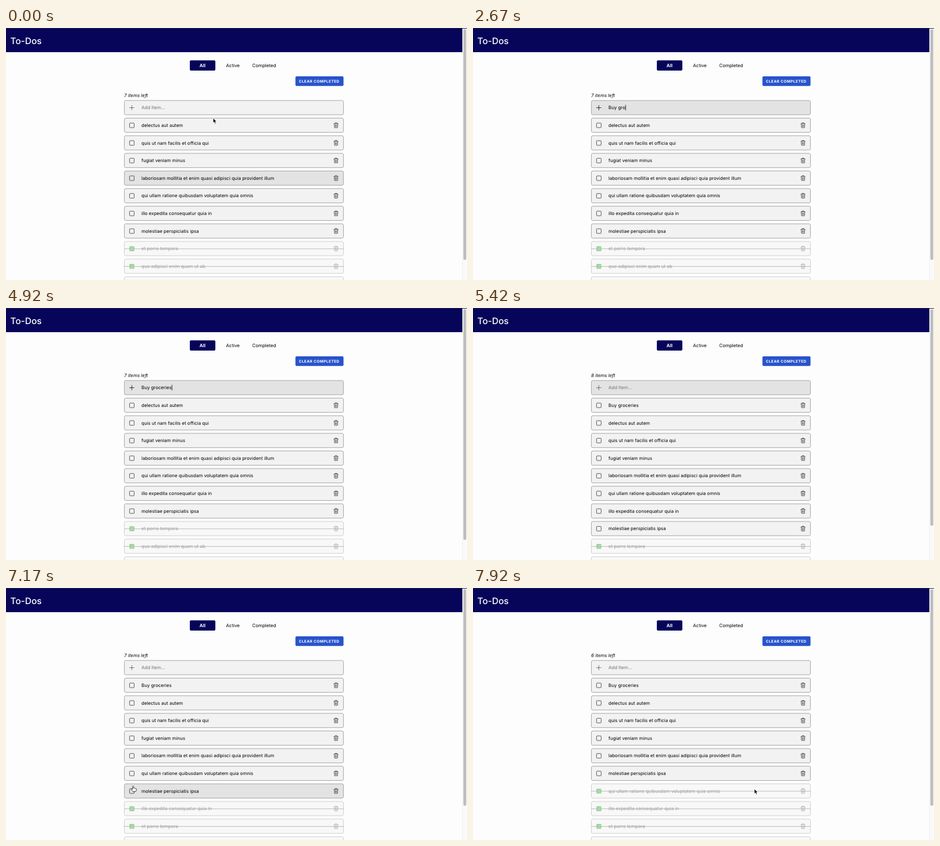
An HTML page for the animation above (8 s loop, 800 px wide and 438 px high).

```html
<!DOCTYPE html>
<html lang="en">
<head>
<meta charset="utf-8">
<title>To-Dos</title>
<style>
  html, body { margin: 0; width: 100%; height: 100%; overflow: hidden; background: #fdfdfd; }
  svg { display: block; width: 100%; height: 100%; }
  text { font: 400 8px Inter, "Liberation Sans", sans-serif; white-space: pre; text-rendering: geometricPrecision; }
  .title { font-size: 15.5px; font-weight: 500; fill: #fff; }
  .tab-on { font-weight: 700; fill: #fff; text-anchor: middle; }
  .clear { font-size: 6.5px; font-weight: 700; letter-spacing: .45px; fill: #fff; }
  .count { font-style: italic; }
  .box { fill: #f2f2f2; stroke: #9c9c9c; stroke-width: .9; }
  .hover { fill: #e3e3e3; }
  .hint { fill: #757575; }
  .line { fill: none; stroke: #333; stroke-width: .8; }
  .done { opacity: .4; }
  .done .box { stroke: #808080; }
</style>
</head>
<body>
<svg viewBox="0 0 800 438" preserveAspectRatio="none">
  <defs>
    <g id="bin" class="line" stroke-linejoin="round">
      <path d="M-4-2.8H4M-1.5-2.8V-4.2H1.5V-2.8M-3.1-2.8L-2.6 4.2H2.6L3.1-2.8"/>
      <path d="M-1.2-1.2L-1 2.8M0-1.2V2.8M1.2-1.2L1 2.8" stroke-width=".6"/>
    </g>
    <rect id="open" class="line" x="-4" y="-4" width="8" height="8" rx="1"/>
    <g id="ticked">
      <rect x="-4.3" y="-4.3" width="8.6" height="8.6" rx="1" fill="#189a18"/>
      <path d="M-2.2 0L-.7 1.6L2.3-1.6" fill="none" stroke="#fff" stroke-width="1"/>
    </g>
    <path id="arrow" d="M0 0V8.3L1.9 6.6L3.2 9.7L4.7 9.1L3.4 6.1H6Z" fill="#000" stroke="#fff" stroke-width=".7"/>
    <path id="beam" d="M-1.5-4.5Q0-4.5 0-3.5Q0-4.5 1.5-4.5M0-3.5V3.5M-1.5 4.5Q0 4.5 0 3.5Q0 4.5 1.5 4.5" fill="none" stroke="#222" stroke-width=".8"/>
    <path id="hand" d="M-.9.7Q0-.7.9.7V4Q2 3.2 2.6 4.2Q3.8 3.6 4.3 4.7Q5.6 4.3 5.7 5.7Q5.8 8 4.6 9.8H-.5Q-1.2 8.2-3.4 6.2Q-3.4 4.8-2 5.2L-.9 6Z" fill="#fff" stroke="#111" stroke-width=".8" stroke-linejoin="round"/>
  </defs>

  <rect width="792" height="42" fill="#06055a"/>
  <rect width="800" height="1" fill="#1b1c42"/>
  <text class="title" x="7.6" y="27.7">To-Dos</text>

  <rect x="792" y="1" width="8" height="437" fill="#fafafa"/>
  <path d="M792.3 1V438" stroke="#e8e8e8" stroke-width=".6"/>
  <rect id="thumb" x="793.7" y="2" width="5" rx="2.5" fill="#bdbdbd"/>

  <rect x="319" y="56.2" width="44.3" height="17.8" rx="2" fill="#06055a"/>
  <text class="tab-on" x="341" y="68.3">All</text>
  <text x="381.8" y="68.3">Active</text>
  <text x="427.3" y="68.3">Completed</text>
  <rect x="502.3" y="84" width="83.4" height="16.7" rx="2" fill="#2853cb"/>
  <text class="clear" x="508.2" y="94.7">CLEAR COMPLETED</text>

  <text class="count" id="count" x="205" y="120.4"></text>
  <rect class="box" id="field" x="205.4" y="126" width="380.2" height="24.8" rx="2.5"/>
  <path class="line" id="plus" d="M214 138.5H222.6M218.3 134.2V142.8"/>
  <text id="entry" x="235" y="141.3"></text>
  <rect id="caret" y="133.5" width=".8" height="9.8"/>
  <g id="rows"></g>
  <use id="mouse"/>
</svg>
<script>
const $ = id => document.getElementById(id);
const LOOP = 8000, RATE = 12 / 1000;   // the screen updates 12 times a second
const ROW_Y = 169, PITCH = 30.63;
const ADD = 65, CHECK_1 = 85, CHECK_2 = 91;

const PHRASE = "Buy groceries";
const KEYS = [14, 15, 21, 23, 27, 29, 32, 41, 43, 51, 55, 57, 59];
const TODO = [
  "delectus aut autem", "quis ut nam facilis et officia qui", "fugiat veniam minus",
  "laboriosam mollitia et enim quasi adipisci quia provident illum",
  "qui ullam ratione quibusdam voluptatem quia omnis",
  "illo expedita consequatur quia in", "molestiae perspiciatis ipsa"
];
const DONE = ["et porro tempora", "quo adipisci enim quam ut ab", ""];

// tick, x, y, shape
const MOUSE = [
  [0, 359.5, 156.7, "arrow"], [4, 352, 147, "arrow"], [5, 346.5, 139.5, "arrow"],
  [10, 346, 139, "beam"], [11, 345.5, 138.7, "beam"], [12, 345, 138.5, "beam"], [14, 0, 0, ""],
  [82, 222, 347.7, "hand"], [86, 220.6, 344, "hand"], [87, 219.5, 335, "hand"],
  [88, 219, 326, "hand"], [89, 219, 320.5, "hand"], [92, 262, 326, "arrow"],
  [93, 360, 337, "arrow"], [94, 450, 346, "arrow"], [95, 488.2, 349.2, "arrow"]
];

function mouseAt(n) {
  if (n >= 72 && n < 82) {
    const p = (n - 72) / 9, e = p * p * (3 - 2 * p);
    return [n, 345 - 122 * e, 139 + 204.5 * e, e < .05 ? "beam" : "arrow"];
  }
  return MOUSE.filter(m => m[0] <= n).pop();
}

// -1 is the input field, null is nothing
function hoverAt(n) {
  if (n < 14) return 3;
  if (n < 82) return -1;
  if (n < 89) return 6;
  return n < 92 ? 5 : null;
}

function listsAt(n) {
  const todo = [...TODO], done = [...DONE];
  if (n >= ADD) todo.unshift(PHRASE);
  const check = name => done.unshift(...todo.splice(todo.indexOf(name), 1));
  if (n >= CHECK_1) check(TODO[5]);
  if (n >= CHECK_2) check(TODO[4]);
  return { todo, done };
}

function row(label, slot, done, hover) {
  return `<g transform="translate(0 ${ROW_Y + slot * PITCH})"${done ? ' class="done"' : ""}>
    <rect class="box${hover ? " hover" : ""}" x="205.4" y="-12.4" width="380.2" height="24.8" rx="2.5"/>
    <use href="#${done ? "ticked" : "open"}" x="218.4" y=".2"/>
    <text x="235" y="2.9">${label}</text>
    <use href="#bin" x="572.7" y="0"/>
    ${done ? '<path d="M205 .4H586" stroke="#333" stroke-width=".8"/>' : ""}</g>`;
}

function draw(n) {
  const { todo, done } = listsAt(n), hover = hoverAt(n);
  $("rows").innerHTML = [...todo, ...done].slice(0, 10)
    .map((label, i) => row(label, i, i >= todo.length, i === hover)).join("");
  $("count").textContent = `${todo.length} items left`;
  $("thumb").setAttribute("height", n < ADD ? 401 : 376.5);

  const typed = n < ADD ? PHRASE.slice(0, KEYS.filter(k => k <= n).length) : "";
  const entry = $("entry");
  entry.textContent = typed || "Add Item...";
  entry.setAttribute("class", typed ? "" : "hint");
  $("field").setAttribute("class", hover === -1 ? "box hover" : "box");
  $("plus").style.stroke = typed ? "#000" : "#555";

  const blink = (n >= 38 && n < 41) || (n >= 49 && n < 51);
  $("caret").style.display = typed && !blink ? "" : "none";
  if (typed) $("caret").setAttribute("x", 235.2 + entry.getComputedTextLength());

  const [, x, y, shape] = mouseAt(n), mouse = $("mouse");
  mouse.style.display = shape ? "" : "none";
  mouse.setAttribute("href", "#" + shape);
  mouse.setAttribute("transform", `translate(${x} ${y})`);
}

let last = -1;
const start = performance.now();
function frame() {
  const n = Math.floor(((performance.now() - start) % LOOP) * RATE + 1e-6);
  if (n !== last) draw(last = n);
  requestAnimationFrame(frame);
}
frame();
</script>
</body>
</html>
```
